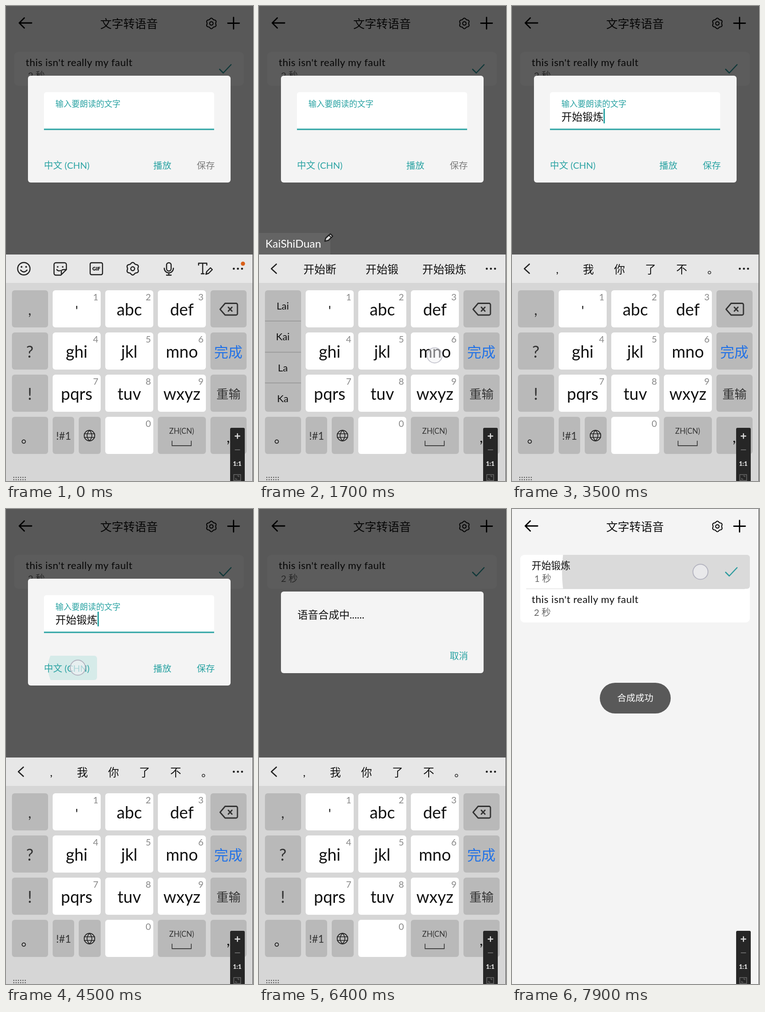
An HTML page that plays this animation: 540x1036 px, repeating every 8 s.

```html
<!DOCTYPE html>
<html lang="zh-CN">
<head>
<meta charset="utf-8">
<title>文字转语音</title>
<style>
  html, body { margin: 0; width: 100%; height: 100%; overflow: hidden; background: #f4f4f4; }
  svg { display: block; width: 100%; height: 100%; }
  text { font-family: Lato, "Noto Sans CJK SC", "Noto Sans CJK", sans-serif; fill: #111; white-space: pre; }
  .mid { text-anchor: middle; }
  .teal { fill: #2aa3a3; }
  .grey { fill: #666; }
  .line { fill: none; stroke: #222; stroke-width: 2.4; stroke-linecap: round; stroke-linejoin: round; }
  #menu { filter: drop-shadow(0 2px 5px rgba(0, 0, 0, .35)); }
</style>
</head>
<body>
<svg id="stage" viewBox="0 0 540 1036"></svg>
<script>
const LOOP = 8000;
const PINYIN = 'KaiShiDuanLian';
const DIGITS = '52474438265426';
const COMMIT = 2790;
const CANDIDATES = [
  '看 就 可 来 开 拉', '卡 拉 啊 开 来 咖', '开 来 卡 拉 凯 赖',
  '开始 来说 开水 开 来 卡', '开始 来说 开车 开 来 卡', '开始 来时 开启 来世 开 来',
  '开始的 开始 来时 开 来', '开始读 开始 来时 开 来', '开始断 开始 来时 开 来',
  '开始断 开始锻 开始锻炼', '开始锻炼 开始 开启 来时 来世'
];
const FOLLOW_UPS = ', 我 你 了 不 。';

// Markup helpers
const text = (x, y, size, s, attrs = '') => `<text x="${x}" y="${y}" font-size="${size}" ${attrs}>${s}</text>`;
const mid = (x, y, size, s, attrs = '') => text(x, y, size, s, `text-anchor="middle" ${attrs}`);
const rect = (x, y, w, h, fill, r = 0, attrs = '') =>
  `<rect x="${x}" y="${y}" width="${w}" height="${h}" rx="${r}" fill="${fill}" ${attrs}/>`;
const line = (d, attrs = '') => `<path class="line" d="${d}" ${attrs}/>`;
const ring = (x, y, r, attrs = '') => `<circle class="line" cx="${x}" cy="${y}" r="${r}" ${attrs}/>`;
const dot = (x, y, r, fill = '#222') => `<circle cx="${x}" cy="${y}" r="${r}" fill="${fill}"/>`;
const group = (id, body, attrs = '') => `<g id="${id}" ${attrs}>${body}</g>`;

function gear(cx, cy, r, hole, attrs) {
  const pts = Array.from({ length: 60 }, (_, i) => {
    const a = i * Math.PI / 30, d = r * (1 - .1 * Math.cos(6 * a));
    return (cx + d * Math.cos(a)).toFixed(1) + ' ' + (cy + d * Math.sin(a)).toFixed(1);
  });
  return line('M' + pts.join('L') + 'z', attrs) + ring(cx, cy, hole, attrs);
}

const ripple = (id, x, y, w, h, cx, cy, fill) =>
  `<clipPath id="${id}Clip">${rect(x, y, w, h, '#000', 6)}</clipPath>` +
  `<circle id="${id}" cx="${cx}" cy="${cy}" r="0" fill="${fill}" clip-path="url(#${id}Clip)"/>`;

function page() {
  const black = 'style="stroke:#000;stroke-width:2.8"';
  return rect(0, 0, 540, 1036, '#f4f4f4') +
    line('M56 37H29M40 26L29 37L40 48', black) +
    mid(269, 48, 25.2, '文字转语音') +
    gear(449, 38, 10.4, 3.8, 'style="stroke:#000;stroke-width:2"') +
    line('M485 37.500H510M497.500 25V50', black) +
    rect(18, 100, 502, 74, '#fff', 9, 'id="card"') +
    ripple('rowRipple', 18, 100, 502, 74, 412, 137, '#dadada') +
    rect(31, 173.5, 478, 1, '#d6d6d6', 0, 'id="divider"') +
    group('oldRow', text(43, 131, 22, "this isn't really my fault", 'letter-spacing=".5"') +
      text(48, 159, 20, '2 秒', 'class="grey"')) +
    group('newRow', text(43, 131, 21.2, '开始锻炼') + text(49, 159, 20, '1 秒', 'class="grey"')) +
    line('M467 138L475 146L492 128', 'style="stroke:#2f9c9f;stroke-width:2.5"');
}

function dialog() {
  return rect(48, 152, 443, 233, '#f4f4f4', 6) +
    rect(83, 188, 372, 82, '#fff', 5) + rect(83, 267.5, 372, 3, '#2aa3a3') +
    text(108, 219.5, 17.8, '输入要朗读的文字', 'class="teal"') +
    text(108, 249.5, 23, '开始锻炼', 'id="entry"') +
    rect(200, 224, 3, 32, '#2aa3a3', 0, 'id="caret"') +
    ripple('langRipple', 64, 320, 135, 53, 157, 346, '#d6ebe9') +
    ripple('saveRipple', 397, 320, 80, 53, 437, 346, '#d6ebe9') +
    text(83, 354.5, 20, '中文 (CHN)', 'class="teal"') +
    text(322, 354.5, 19.8, '播放', 'class="teal"') +
    text(417, 354.5, 19.8, '保存', 'id="save"');
}

const progress = () => rect(48, 180, 443, 178, '#f4f4f4', 6) +
  text(84, 239, 22.8, '语音合成中......') + text(417, 328, 20, '取消', 'class="teal"');

const menu = () => rect(-10, -10, 303, 317, '#fff', 6) +
  ripple('menuRipple', -10, 8, 303, 72, 146, 44, '#d9d9d9') +
  ['中文 (CHN)', '日语 (JPN)', '英语 (USA)', '韩语 (KOR)']
    .map((s, i) => text(24, 53 + 72 * i, 23, s)).join('');

const icons = () =>
  ring(39, 573, 13.5) + dot(34, 569, 1.9) + dot(44, 569, 1.9) + line('M32 576Q39 584 46 576') +
  line('M109 560H128a4 4 0 0 1 4 4V575L120 587H109a4 4 0 0 1-4-4V564a4 4 0 0 1 4-4zM131 575H125a4 4 0 0 0-4 4V586') +
  dot(113, 569, 1.8) + dot(124, 569, 1.8) + line('M111 575Q114 579 119 577') +
  rect(184, 560, 27, 26, 'none', 3, 'class="line"') + mid(197.5, 577, 11, 'GIF', 'font-weight="900"') +
  gear(277, 573, 12.5, 4.2) +
  rect(351, 560, 10, 18, 'none', 5, 'class="line"') + line('M346 572a10 10 0 0 0 20 0M356 582V587M351 587H361') +
  line('M421 565V561H439V565M430 561V584M427 584H433') + line('M437 585L439 579L447 571L451 575L443 583z') +
  dot(518, 562, 4.6, '#d9601a');

function keyboard() {
  const grey = '#b9b9b9', rows = [620, 712, 804, 896];
  const key = (x, y, w, fill) => rect(x, y, w, 81, fill, 6);
  const letters = ["'", 'abc', 'def', 'ghi', 'jkl', 'mno', 'pqrs', 'tuv', 'wxyz'];
  let s = rect(0, 542, 540, 494, '#d6d6d6') + rect(0, 542, 540, 62, '#e7e7e7');
  letters.forEach((label, i) => {
    const x = 102 + 115 * (i % 3), y = rows[Math.floor(i / 3)];
    s += key(x, y, 105, '#fff') + mid(x + 52.5, y + 55, i ? 36 : 28, label) +
      mid(x + 94, y + 22, 20, i + 1, 'fill-opacity=".5"');
  });
  rows.slice(0, 3).forEach(y => s += key(447, y, 79, grey));
  s += line('M479 648.500H503a3 3 0 0 1 3 3V671a3 3 0 0 1-3 3H479L468 661.500zM486 657L494 665.500M494 657L486 665.500',
    'style="stroke:#333;stroke-width:2.8"');
  s += text(455, 766, 31, '完成', 'style="fill:#2272e6"') + text(460, 856, 26.5, '重输', 'style="fill:#333"');
  s += key(13, 896, 79, grey) + text(33, 952, 30, '。') +
    key(102, 896, 47, grey) + mid(126, 946, 23, '!#1', 'style="fill:#333"') +
    key(159, 896, 48, grey) +
    `<g style="stroke-width:1.8">${ring(182.5, 937, 11.5, 'style="stroke-width:inherit"')}` +
    line('M171 933H194M171 941H194M182.500 925.500Q172 937 182.500 948.500Q193 937 182.500 925.500', 'style="stroke-width:1.6"') + '</g>' +
    key(217, 896, 105, '#fff') + mid(311, 918, 20, '0', 'fill-opacity=".5"') +
    key(332, 896, 105, grey) + mid(384, 933, 16.4, 'ZH(CN)', 'style="fill:#333"') +
    line('M363 949V959H405V949', 'style="stroke:#444;stroke-width:1.8"') +
    key(447, 896, 79, grey) + mid(486, 952, 32, ',');
  for (let i = 0; i < 12; i++) s += rect(16 + 5 * (i % 6), 1027 + 5 * Math.floor(i / 6), 2.2, 2.2, '#555');

  s += group('marks', rows.slice(0, 3).map((y, i) =>
    key(13, y, 79, grey) + mid(52, [674, 767, 859][i], [32, 36, 36][i], ',?!'[i], 'style="fill:#333"')).join(''));
  s += group('syllables', rect(13, 620, 79, 265, grey, 6) +
    [687, 755, 822].map(y => rect(13, y - .5, 79, 1.2, '#8c8c8c')).join('') +
    [0, 1, 2, 3].map(i => mid(52, 662 + 67.4 * i, 21.5, '', 'class="syllable"')).join(''));
  s += group('icons', icons());
  s += group('bar', line('M38 563L27 573L38 583', 'style="stroke-width:2.6"') + '<g id="words"></g>');
  return s + dot(498, 573, 2.3) + dot(507, 573, 2.3) + dot(516, 573, 2.3);
}

const composer = () => rect(0, 495, 0, 47, '#646464', 0, 'id="composeBox"') +
  text(14, 526.5, 24, '', 'id="composed" style="fill:#fff"') +
  group('pencil', '<path d="M-8 8L-6 1L4 -8L9 -3L0 6z" fill="#ddd" stroke="#222" stroke-width="2.6" stroke-linejoin="round"/>' +
    '<path d="M1 -5L6 0" stroke="#222" stroke-width="2"/>');

const zoomer = () => rect(490, 920, 32, 130, '#262626', 3) +
  line('M501 938H511M506 933V943', 'style="stroke:#ddd"') + line('M501 968H511', 'style="stroke:#666;stroke-width:2"') +
  mid(505.5, 1003, 13, '1:1', 'font-weight="900" style="fill:#ddd"') +
  rect(498, 1022, 15, 13, 'none', 0, 'stroke="#666" stroke-width="1.6"') +
  line('M502 1030V1032H505M509 1027V1025H506', 'style="stroke:#666;stroke-width:1.4"');

const stage = document.getElementById('stage');
stage.innerHTML = page() + rect(0, 0, 540, 1036, '#000', 0, 'id="dim"') +
  group('dialog', dialog()) + group('progress', progress()) + group('menu', menu()) +
  group('composer', composer()) + group('keyboard', keyboard()) +
  '<circle id="touch" r="16.500" fill="#f2f2f4" fill-opacity=".65" stroke="#b4b4c0" stroke-width="2"/>' +
  zoomer() + rect(539, 0, 1, 1036, '#4a4a4a');

const $ = id => document.getElementById(id);
const ramp = (t, a, b) => Math.min(1, Math.max(0, (t - a) / (b - a)));
const ease = p => p * p * (3 - 2 * p);
const fade = (id, v) => { $(id).style.opacity = v; };
const between = (t, a, b) => t >= a && t < b;

// Touches: start, end, x, y
const touches = [...DIGITS].map((d, i) => {
  const start = i ? 210 + 156 * i : 100;
  return [start, start + (i ? 155 : 200), 154 + 115 * ((d - 1) % 3), 670 + 92 * Math.floor((d - 1) / 3)];
}).concat([[2610, 2800, 123, 577], [4370, 4600, 157, 346], [5310, 5620, 230, 51], [5960, 6130, 437, 347], [7650, 8100, 412, 137]]);

// Ripples: id, start, end, first radius, last radius
const ripples = [
  ['langRipple', 4350, 4550, 20, 80], ['menuRipple', 5320, 5520, 40, 153],
  ['saveRipple', 5970, 6120, 15, 60], ['rowRipple', 7650, 7950, 60, 350]
];

let shownWords;
function setWords(words) {
  if (words === shownWords) return;
  shownWords = words;
  let x = 65;
  $('words').innerHTML = words.split(' ').map(w => {
    const slot = w.length > 2 ? 136 : 68;
    x += slot;
    return mid(x - slot / 2, 582.5, 24, w);
  }).join('');
}

let shownCount;
function setCount(n) {
  if (n === shownCount) return;
  shownCount = n;
  const syllables = [['K', 'J', 'L', '5'], ['Ka', 'La', 'K', 'L']][n - 1] || ['Lai', 'Kai', 'La', 'Ka'];
  document.querySelectorAll('.syllable').forEach((el, i) => { el.textContent = syllables[i]; });
  $('composed').textContent = PINYIN.slice(0, n);
  const right = 14 + $('composed').getComputedTextLength() + 20;
  $('composeBox').setAttribute('width', right);
  $('pencil').setAttribute('transform', `translate(${right - 4} 505)`);
}

function draw(t) {
  const count = Math.min(PINYIN.length, Math.max(0, Math.floor((t - 290) / 156) + 1));
  const typing = count > 0 && t < COMMIT, done = t >= COMMIT;
  if (typing) setCount(count);
  if (count) setWords(done ? FOLLOW_UPS : CANDIDATES[Math.min(count, CANDIDATES.length) - 1]);
  fade('composer', +typing);
  fade('syllables', +typing);
  fade('marks', +!typing);
  fade('icons', +!count);
  fade('bar', +!!count);

  fade('entry', +done);
  fade('caret', +(done && (t < 3050 || (t - 3050) % 1000 < 500)));
  $('save').style.fill = done ? '#2aa3a3' : '#7c7c7c';
  fade('dialog', 1 - ramp(t, 6150, 6260));
  fade('progress', ramp(t, 6200, 6310) * (1 - ramp(t, 6750, 6920)));
  fade('menu', ramp(t, 4650, 4950) * (1 - ramp(t, 5620, 5800)));
  fade('dim', .64 * (1 - ramp(t, 6800, 7000)));

  const slide = ramp(t, 6870, 7000);
  $('keyboard').setAttribute('transform', `translate(0 ${slide ** 3 * 500})`);
  fade('keyboard', slide < 1 ? 1 - .55 * slide : 0);

  const saved = t >= 6700;
  $('card').setAttribute('height', saved ? 147.5 : 74);
  fade('divider', +saved);
  $('oldRow').setAttribute('transform', `translate(0 ${74 * ease(ramp(t, 7000, 7220))})`);
  fade('newRow', ramp(t, 7180, 7420));
  fade('toast', ramp(t, 7080, 7380));

  for (const [id, a, b, r0, r1] of ripples) {
    $(id).setAttribute('r', r0 + (r1 - r0) * ramp(t, a, b));
    fade(id, t < a ? 0 : 1 - ramp(t, b + 50, b + 200));
  }

  const touch = touches.find(([a, b]) => between(t, a, b));
  fade('touch', touch ? 1 - ramp(t, touch[1] - 90, touch[1]) : 0);
  if (touch) {
    $('touch').setAttribute('cx', touch[2]);
    $('touch').setAttribute('cy', touch[3]);
  }
}

$('dialog').insertAdjacentHTML('beforebegin',
  group('toast', rect(192, 379, 155, 67, '#595959', 33.5) + mid(269.5, 418.5, 19.8, '合成成功', 'style="fill:#fff"')));

const start = performance.now();
function tick() {
  draw((performance.now() - start) % LOOP);
  requestAnimationFrame(tick);
}
tick();
</script>
</body>
</html>
```
